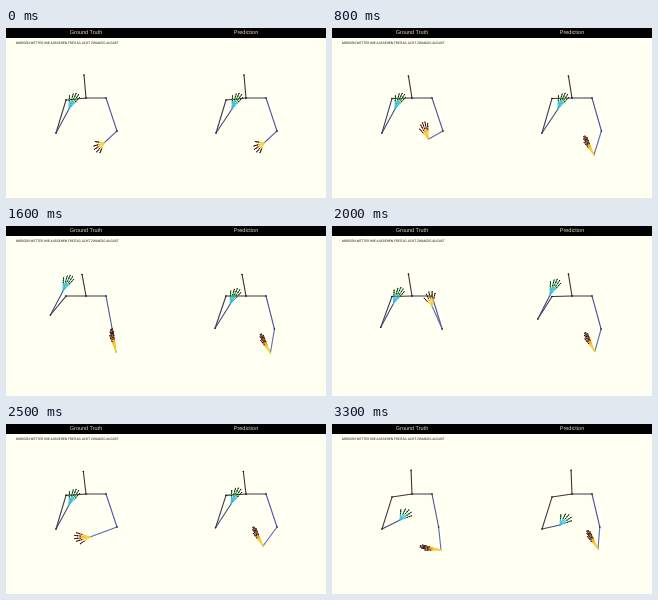
Recreate the animation shown at these times as an HTML page. Size 320 by 170 pixels, loop 3400 ms.

```html
<!DOCTYPE html>
<html lang="de">
<head>
<meta charset="utf-8">
<title>Pose comparison</title>
<style>
html, body { margin: 0; width: 100%; height: 100%; overflow: hidden; background: #fffff2; }
svg { display: block; width: 320px; height: 170px; }
text { text-rendering: geometricPrecision; font-family: "Liberation Sans", Arial, sans-serif; }
.head { font-size: 5.5px; fill: #dedcc0; text-anchor: middle; }
.gloss { font-family: Roboto, "Liberation Sans", sans-serif; font-size: 3.3px; fill: #1c1c18; }
line { stroke-linecap: round; }
</style>
</head>
<body>
<svg viewBox="0 0 320 170">
  <rect width="320" height="170" fill="#fffff2"/>
  <rect width="320" height="10" fill="#000"/>
  <text class="head" x="80" y="6">Ground Truth</text>
  <text class="head" x="240" y="6">Prediction</text>
  <text class="gloss" x="10" y="16.2">MORGEN WETTER WIE-AUSSEHEN FREITAG ACHT ZWANZIG AUGUST</text>
  <g id="truth"></g>
  <g id="prediction" transform="translate(160 0)"></g>
</svg>
<script>
const LOOP = 3400, STEP = 100;

// The left hand rests, rises once around `peak`, and sinks at the end.
// The right hand visits a few points: time, wrist x, y, direction in degrees, hand length.
const signer = {
  rest: [63, 81], raise: [-6, -16], peak: 1600, sink: [5, 15],
  right: [
    [0, 98, 115, 138, 12],
    [500, 95, 101, 255, 15],
    [1200, 98, 125, 255, 23],
    [1600, 110, 126, 258, 24],
    [2000, 100, 80, 264, 15],
    [2500, 84, 113, 180, 16],
    [3300, 109, 126, 190, 22]
  ]
};
const model = {
  rest: [66, 81], raise: [-8, -12], peak: 2000, sink: [2, 20],
  right: [
    [0, 98, 115, 138, 12],
    [500, 101, 127, 243, 22],
    [1800, 105, 127, 243, 22],
    [2500, 97, 122, 243, 22],
    [3300, 106, 125, 240, 22]
  ]
};

const coolHand = ["#30b8e4", "#28b090", "#2fa82c", "#1c5a20"];
const warmHand = ["#f8cc30", "#f0a020", "#a04814", "#581a0c"];

const lerp = (a, b, k) => a + (b - a) * k;
const clamp01 = k => Math.max(0, Math.min(1, k));
const polar = ([x, y], angle, r) => [x + r * Math.cos(angle), y + r * Math.sin(angle)];

function along(path, t) {
  const i = Math.max(1, path.findIndex(point => point[0] >= t));
  const a = path[i - 1], b = path[i];
  const k = (t - a[0]) / (b[0] - a[0]);
  return a.map((v, j) => lerp(v, b[j], k));
}

const line = (a, b, color, width = 1.1) =>
  `<line x1="${a[0]}" y1="${a[1]}" x2="${b[0]}" y2="${b[1]}" stroke="${color}" stroke-width="${width}"/>`;
const dot = (p, r) => `<circle cx="${p[0]}" cy="${p[1]}" r="${r}" fill="#14141a"/>`;

// A hand that looks longer is seen edge-on, so its fingers lie closer together.
function hand(wrist, degrees, length, colors) {
  const angle = degrees * Math.PI / 180;
  const side = Math.sin(angle) > .1 ? 1 : -1;
  const spread = side * Math.max(.05, .3 - .024 * (length - 12));
  let bones = "", joints = "";
  for (const slot of [3, 1.5, .5, -.5, -1.5]) {
    const reach = length * (1 - .09 * Math.abs(slot));
    let from = wrist;
    colors.forEach((color, i) => {
      const to = polar(wrist, angle + slot * spread, reach * (.46 + .18 * i));
      bones += line(from, to, color, 1);
      if (i) joints += dot(to, .6);
      from = to;
    });
  }
  return bones + joints;
}

function figure(person, t) {
  const sway = Math.sin(Math.PI * t / 2800);
  const neck = [80, 70], nose = [78 - 2 * sway, 47 + 1.5 * sway];
  const left = [60, 72 - 2 * sway], right = [100, 70];

  const lift = Math.exp(-(((t - person.peak) / 330) ** 2));
  const drop = clamp01((t - 2500) / 800);
  const leftWrist = person.rest.map((v, i) => v + person.raise[i] * lift + person.sink[i] * drop);
  const leftY = Math.min(105, leftWrist[1] + 24);
  const leftElbow = [50 - .35 * (105 - leftY), leftY];

  const [, x, y, degrees, length] = along(person.right, t);
  const rightWrist = [x, y];
  const rightElbow = [111 - .4 * Math.max(0, x - 98), 103];

  return line(nose, neck, "#40303a") +
    line(neck, left, "#38343c") + line(neck, right, "#38384c") +
    line(left, leftElbow, "#3c3a50") + line(leftElbow, leftWrist, "#46467c") +
    line(right, rightElbow, "#5050a0") + line(rightElbow, rightWrist, "#5c68b4") +
    [nose, neck, left, right, leftElbow, rightElbow].map(p => dot(p, .8)).join("") +
    hand(leftWrist, lerp(-61, -42, drop), lerp(18, 14, drop), coolHand) +
    hand(rightWrist, degrees, length, warmHand);
}

const truthGroup = document.getElementById("truth");
const predictionGroup = document.getElementById("prediction");
const start = performance.now();

function tick() {
  const elapsed = (performance.now() - start) % LOOP;
  const t = Math.floor(elapsed / STEP) * STEP;
  truthGroup.innerHTML = figure(signer, t);
  predictionGroup.innerHTML = figure(model, t);
  requestAnimationFrame(tick);
}
tick();
</script>
</body>
</html>
```
